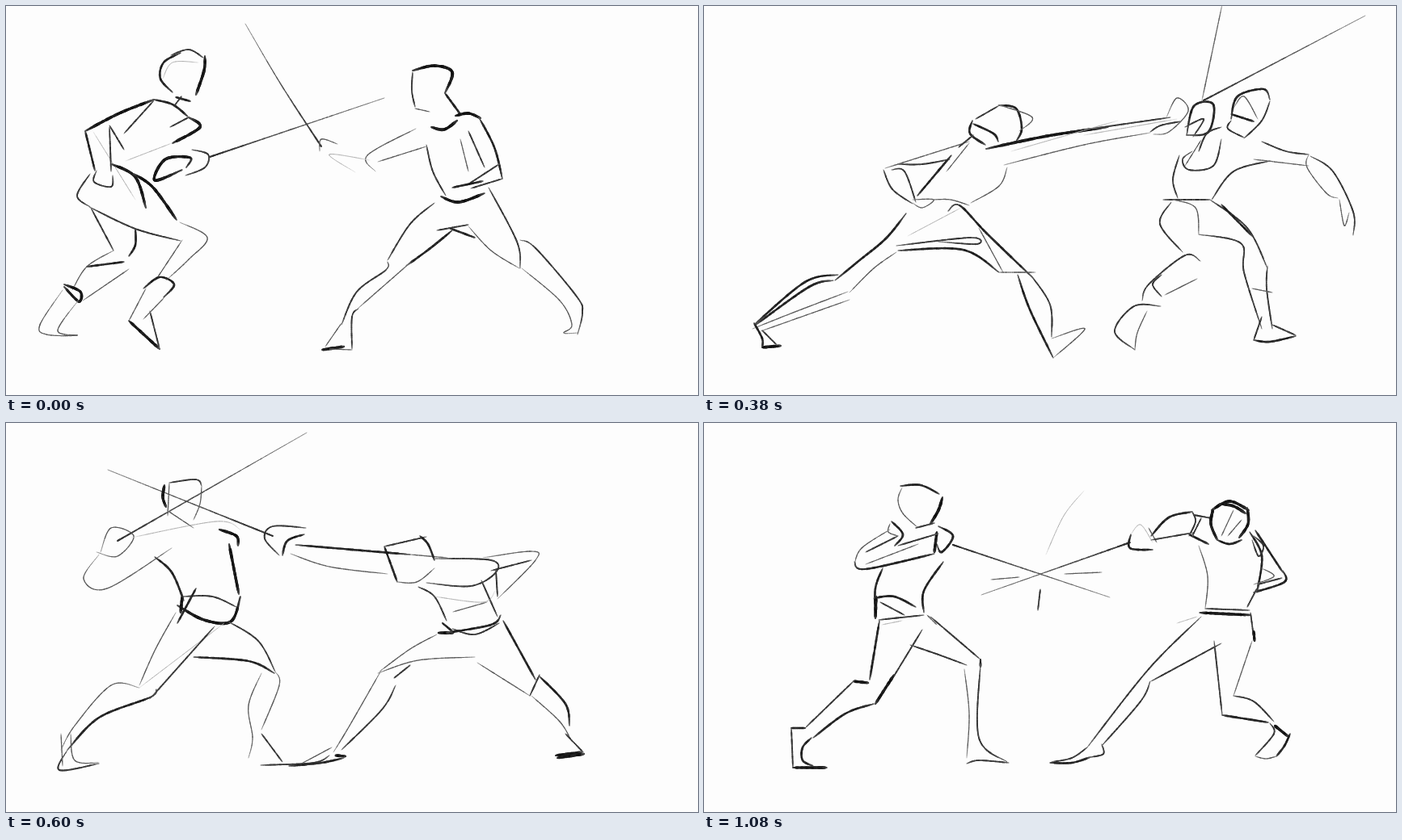
An HTML page with a canvas that plays this animation: 856x482 px, repeating every 1200 ms.

```html
<!DOCTYPE html>
<html lang="en">
<head>
<meta charset="utf-8">
<title>Fencers</title>
<style>
html, body { margin: 0; height: 100%; overflow: hidden; background: #fdfdfd; }
canvas { display: block; }
</style>
</head>
<body>
<canvas id="stage" width="856" height="482"></canvas>
<script>
const ctx = document.getElementById("stage").getContext("2d");
let seed;

function random() {
  seed = (seed * 16807) % 2147483647;
  return seed / 2147483647;
}

// Catmull-Rom value between b and c
function spline(a, b, c, d, t) {
  return b + t / 2 * (c - a + t * (2 * a - 5 * b + 4 * c - d + t * (3 * (b - c) + d - a)));
}

function trace(xy) {
  const pts = [], out = [];
  for (let i = 0; i < xy.length; i += 2) pts.push([xy[i], xy[i + 1]]);
  for (let i = 0; i < pts.length - 1; i++) {
    const b = pts[i], c = pts[i + 1];
    const a = pts[i - 1] || b, d = pts[i + 2] || c;
    const steps = Math.ceil(Math.hypot(c[0] - b[0], c[1] - b[1]) / 2);
    for (let s = 0; s < steps; s++) {
      out.push([0, 1].map(k => spline(a[k], b[k], c[k], d[k], s / steps)));
    }
  }
  out.push(pts[pts.length - 1]);
  return out;
}

const taper = u => Math.min(1, 0.45 + 3 * Math.min(u, 1 - u));
const fade = u => 1 - 0.7 * u;

// A pencil draws a curve through the given x, y points.
function pencil(width, dark, press = taper) {
  return (...xy) => {
    const line = trace(xy);
    for (let i = 1; i < line.length; i++) {
      const p = press(i / line.length);
      const shade = Math.min(215, dark + (1 - p) * 110 + random() * 25);
      ctx.strokeStyle = `rgb(${shade},${shade},${shade})`;
      ctx.lineWidth = width * p * (0.85 + 0.3 * random());
      ctx.beginPath();
      ctx.moveTo(...line[i - 1]);
      ctx.lineTo(...line[i]);
      ctx.stroke();
    }
  };
}

const faint = pencil(0.8, 160);
const thin = pencil(1.2, 80);
const line = pencil(1.8, 45);
const bold = pencil(2.5, 25);
const fat = pencil(3.4, 12);
const blade = pencil(2, 35, fade);

function approach() {
  blade(252, 187, 468, 114);
  blade(390, 174, 340, 97, 296, 22);
  // left
  bold(216, 58, 195, 70, 191, 90, 206, 107);
  line(204, 61, 226, 54, 244, 64);
  fat(246, 62, 245, 80, 235, 110);
  faint(194, 90, 206, 70, 238, 70);
  bold(210, 113, 228, 118);
  line(217, 112, 208, 124);
  fat(98, 155, 140, 133, 183, 116);
  bold(183, 116, 206, 122, 225, 137);
  line(183, 117, 146, 158);
  fat(206, 170, 240, 150, 226, 138);
  line(226, 138, 203, 150);
  faint(148, 192, 205, 170);
  faint(108, 156, 160, 240);
  bold(98, 155, 110, 204);
  line(128, 150, 130, 205);
  line(128, 148, 146, 178);
  line(112, 204, 109, 218, 130, 224, 132, 210);
  fat(131, 196, 160, 212, 173, 250);
  fat(223, 200, 228, 188, 197, 190, 184, 216, 218, 203);
  line(230, 178, 250, 184, 246, 200, 222, 210);
  line(104, 208, 88, 235, 104, 249);
  line(103, 249, 160, 276, 216, 291);
  line(105, 250, 133, 303);
  fat(158, 208, 182, 225, 211, 265);
  thin(215, 268, 249, 287, 226, 314, 198, 340);
  thin(218, 290, 185, 340);
  bold(160, 276, 160, 296, 152, 310);
  thin(133, 303, 100, 323, 82, 352);
  bold(146, 317, 100, 323);
  thin(152, 326, 95, 365);
  fat(72, 345, 92, 354, 90, 366, 72, 348);
  thin(70, 352, 42, 395, 50, 407, 88, 408, 64, 402, 90, 364);
  bold(170, 350, 190, 336, 208, 345, 195, 361);
  thin(173, 350, 152, 390);
  fat(152, 390, 190, 425);
  line(190, 425, 178, 378);
  thin(196, 361, 170, 388);
  // right
  fat(503, 80, 530, 74, 552, 82, 543, 108);
  line(503, 82, 502, 105, 506, 125);
  bold(543, 108, 562, 134);
  thin(506, 127, 524, 131);
  fat(526, 150, 542, 153, 558, 142);
  fat(556, 136, 572, 133, 587, 139);
  line(520, 172, 528, 205, 544, 235);
  thin(562, 165, 572, 205);
  bold(585, 138, 604, 175, 614, 214);
  line(572, 155, 592, 200);
  line(614, 214, 575, 226);
  line(610, 196, 570, 222);
  bold(552, 225, 590, 217);
  fat(538, 236, 560, 243, 592, 232);
  thin(507, 152, 447, 185, 457, 205);
  thin(520, 174, 460, 193);
  faint(450, 191, 400, 184, 432, 206);
  thin(410, 171, 390, 165, 388, 180);
  line(530, 244, 500, 270, 472, 315);
  bold(552, 278, 525, 300, 495, 322);
  thin(500, 318, 435, 375);
  line(472, 317, 470, 327, 434, 354, 415, 395);
  line(436, 375, 428, 385, 428, 425);
  thin(415, 393, 395, 422);
  fat(391, 426, 418, 422);
  thin(400, 425, 428, 426);
  line(533, 278, 572, 271);
  bold(548, 275, 580, 287);
  thin(572, 273, 600, 303, 635, 325);
  line(597, 225, 632, 292, 636, 325);
  line(636, 290, 655, 300, 706, 360, 713, 380, 707, 407);
  thin(638, 325, 685, 365, 700, 395, 690, 405, 708, 405);
}

function lunge() {
  thin(616, 117, 641, -2);
  blade(618, 117, 818, 12);
  // left
  bold(364, 123, 386, 127, 393, 152, 386, 168);
  thin(366, 123, 406, 138, 390, 155);
  line(364, 124, 336, 140);
  bold(332, 142, 329, 158, 348, 172);
  bold(333, 146, 358, 158, 364, 168);
  fat(349, 177, 425, 161, 500, 150);
  line(480, 152, 577, 138);
  thin(371, 197, 470, 172, 552, 157);
  faint(380, 180, 512, 142);
  faint(470, 160, 585, 140);
  thin(572, 138, 585, 114, 599, 130, 575, 156, 556, 159);
  line(552, 156, 565, 148, 590, 143);
  thin(328, 168, 224, 201);
  line(222, 203, 233, 227, 258, 245);
  line(232, 203, 248, 205, 262, 243);
  line(240, 196, 270, 196, 304, 190);
  line(333, 160, 315, 175);
  bold(306, 185, 264, 235);
  thin(328, 170, 300, 205);
  thin(375, 200, 365, 223, 330, 244);
  thin(258, 240, 284, 240, 270, 250, 258, 244);
  thin(283, 240, 305, 240, 328, 247);
  bold(302, 254, 316, 247, 350, 282, 406, 336);
  bold(250, 257, 225, 288, 190, 317, 162, 340);
  bold(240, 303, 320, 302, 365, 330);
  line(238, 297, 330, 287, 338, 295, 290, 292);
  thin(238, 305, 210, 325, 180, 355);
  faint(252, 285, 318, 250);
  thin(340, 275, 370, 330);
  thin(365, 330, 410, 330);
  bold(166, 333, 125, 342, 62, 395);
  bold(64, 395, 130, 348, 160, 340);
  thin(60, 400, 110, 380, 178, 354);
  thin(70, 403, 180, 364);
  bold(62, 393, 72, 412, 72, 423);
  fat(72, 423, 95, 421);
  line(72, 402, 90, 420);
  line(404, 333, 428, 370, 430, 410);
  bold(388, 333, 403, 376, 432, 436);
  thin(430, 412, 471, 400, 432, 436);
  // right
  bold(597, 160, 606, 124, 630, 122, 624, 156, 597, 160);
  line(595, 150, 618, 140, 605, 162);
  bold(652, 140, 660, 112, 692, 103, 700, 116);
  line(700, 118, 690, 142, 668, 164);
  line(652, 142, 648, 152, 668, 163);
  bold(652, 134, 680, 143);
  thin(656, 125, 668, 112, 685, 140);
  line(640, 150, 622, 158, 612, 180);
  thin(615, 166, 595, 198);
  line(640, 165, 630, 198, 600, 203, 592, 190, 604, 180);
  line(588, 185, 580, 215, 586, 238);
  line(700, 192, 655, 205, 628, 240);
  line(690, 168, 720, 180, 748, 184);
  thin(680, 190, 748, 198);
  thin(748, 184, 746, 200, 770, 232, 784, 238);
  line(750, 186, 778, 205, 803, 255, 803, 284);
  thin(786, 240, 792, 272, 798, 256);
  line(568, 240, 626, 240);
  line(626, 240, 672, 275, 697, 325);
  bold(640, 246, 678, 285);
  line(578, 243, 564, 270, 592, 305);
  thin(580, 240, 608, 250, 612, 283);
  line(612, 283, 664, 294, 668, 330, 690, 400);
  line(697, 322, 696, 350, 703, 400);
  thin(678, 350, 703, 355);
  line(690, 385, 680, 414);
  bold(680, 414, 700, 416, 732, 409);
  line(703, 395, 732, 408);
  line(614, 316, 595, 309, 550, 345, 542, 365);
  thin(610, 338, 570, 358);
  line(566, 333, 555, 345, 566, 360);
  line(565, 372, 532, 372, 508, 403, 533, 426);
  thin(533, 426, 536, 405, 548, 378);
}

function parry() {
  blade(138, 146, 372, 12);
  blade(330, 140, 126, 58);
  // left
  fat(196, 77, 194, 92, 198, 104);
  line(202, 74, 235, 70, 242, 78);
  thin(242, 78, 240, 100, 232, 120);
  thin(202, 74, 200, 115);
  thin(199, 108, 232, 130);
  thin(117, 160, 130, 130, 158, 140, 138, 165, 112, 160);
  thin(115, 163, 96, 193, 125, 205, 205, 155);
  faint(155, 142, 260, 122, 290, 132);
  fat(264, 132, 285, 140, 287, 152);
  fat(276, 150, 288, 212);
  bold(184, 166, 205, 185, 220, 220);
  fat(290, 215, 278, 246, 245, 244, 212, 226);
  line(218, 215, 255, 215, 285, 228);
  fat(218, 215, 216, 235);
  bold(235, 205, 212, 248);
  thin(210, 235, 185, 280, 165, 325);
  faint(270, 248, 165, 328);
  line(258, 252, 178, 342);
  line(275, 246, 312, 270, 333, 308);
  bold(232, 290, 300, 295, 332, 310);
  thin(165, 328, 130, 325, 85, 375, 68, 405);
  bold(186, 330, 178, 340, 115, 365, 76, 405);
  line(76, 405, 66, 430, 115, 422);
  thin(68, 385, 70, 425);
  thin(80, 385, 85, 418, 115, 421);
  thin(316, 310, 300, 350, 305, 390, 300, 415);
  thin(333, 308, 338, 325, 316, 380);
  line(316, 385, 342, 420);
  line(315, 424, 380, 421, 400, 412);
  // right
  line(371, 130, 330, 128, 320, 143, 338, 164);
  bold(369, 138, 348, 146, 342, 164);
  bold(358, 151, 500, 163);
  thin(500, 163, 546, 167);
  thin(352, 162, 400, 178, 472, 187);
  line(468, 153, 520, 141);
  bold(512, 140, 522, 150, 530, 170);
  bold(468, 153, 484, 197);
  thin(484, 197, 508, 197, 530, 180);
  line(530, 168, 600, 170, 606, 185, 575, 202, 520, 198);
  line(510, 203, 530, 215, 545, 245);
  line(588, 195, 608, 240);
  faint(530, 215, 590, 222, 605, 208);
  thin(553, 234, 595, 222);
  fat(535, 260, 553, 260);
  bold(540, 248, 552, 258);
  line(552, 255, 580, 262, 610, 248);
  bold(545, 260, 600, 250, 612, 238);
  line(600, 183, 650, 170);
  thin(590, 167, 650, 159, 655, 170, 608, 218);
  line(606, 182, 608, 215);
  thin(533, 262, 500, 280, 462, 308);
  thin(460, 310, 510, 294, 580, 290);
  line(480, 316, 500, 300);
  thin(583, 297, 648, 338);
  thin(465, 305, 425, 375, 405, 408);
  line(482, 325, 465, 355, 415, 405);
  bold(615, 245, 655, 318);
  line(660, 312, 648, 338);
  bold(660, 314, 692, 348, 697, 375);
  thin(650, 338, 685, 370, 700, 395);
  thin(403, 402, 360, 425);
  bold(350, 425, 390, 421, 418, 415);
  fat(408, 412, 420, 413);
  fat(680, 412, 712, 408);
  fat(682, 415, 715, 410);
  line(692, 385, 714, 408);
}

function cross() {
  blade(278, 213, 370, 277, 442, 323);
  blade(513, 190, 318, 310);
  line(510, 191, 375, 272);
  // left
  bold(246, 78, 270, 72, 297, 82, 284, 125);
  faint(248, 76, 236, 100, 248, 125);
  thin(252, 88, 268, 68, 285, 90);
  thin(255, 95, 260, 110, 250, 122);
  bold(246, 121, 258, 126);
  line(270, 127, 285, 128);
  thin(215, 118, 173, 185);
  bold(212, 120, 225, 130, 232, 125);
  thin(232, 128, 195, 175);
  bold(170, 190, 195, 190, 225, 194);
  thin(222, 150, 218, 180);
  thin(190, 180, 235, 195);
  thin(196, 173, 265, 188);
  thin(232, 200, 270, 188, 284, 200, 265, 210, 235, 198);
  line(274, 133, 284, 170, 284, 210);
  bold(210, 213, 278, 212);
  fat(214, 210, 205, 235, 270, 247);
  bold(276, 215, 270, 250);
  thin(230, 238, 250, 252, 270, 255);
  thin(255, 258, 210, 325);
  thin(268, 252, 215, 320);
  bold(272, 240, 310, 270, 337, 312);
  bold(243, 290, 290, 296, 315, 309);
  thin(337, 312, 338, 328, 315, 380);
  thin(318, 308, 303, 350, 308, 390, 300, 418);
  line(306, 385, 320, 405, 345, 427);
  bold(298, 422, 345, 428);
  faint(330, 318, 308, 395);
  faint(200, 325, 180, 307, 140, 325, 122, 355);
  thin(203, 318, 160, 316, 130, 345);
  line(210, 328, 198, 350, 165, 340, 130, 358);
  thin(130, 358, 103, 408);
  bold(128, 350, 92, 376);
  line(92, 376, 106, 422);
  thin(120, 345, 112, 385);
  // right
  thin(518, 185, 538, 150, 548, 180, 525, 198, 513, 190);
  fat(549, 174, 569, 163);
  bold(549, 160, 570, 131, 608, 117, 635, 143);
  line(570, 160, 606, 140);
  thin(595, 150, 612, 120);
  bold(650, 97, 675, 87, 698, 87, 692, 122);
  line(650, 97, 643, 120, 645, 138, 680, 135);
  thin(692, 120, 684, 138);
  thin(605, 140, 640, 148, 675, 143);
  thin(615, 145, 625, 170, 600, 210, 578, 245);
  faint(612, 185, 672, 208, 700, 180, 660, 145);
  thin(672, 205, 650, 240);
  fat(652, 222, 670, 225, 658, 232);
  bold(680, 130, 700, 165, 735, 208);
  line(680, 145, 710, 175, 732, 205);
  line(735, 208, 705, 222, 655, 237);
  thin(690, 188, 660, 215);
  fat(560, 247, 605, 242, 648, 248);
  fat(566, 252, 585, 261, 640, 256);
  thin(575, 250, 645, 250, 630, 266);
  bold(565, 250, 522, 316);
  fat(572, 290, 536, 330);
  bold(568, 278, 615, 293, 648, 320);
  line(522, 316, 500, 320, 452, 392);
  thin(548, 332, 470, 380);
  line(448, 390, 415, 423);
  fat(415, 423, 453, 423);
  line(466, 385, 453, 423);
  bold(460, 388, 440, 408);
  bold(648, 258, 655, 285, 668, 325);
  bold(606, 287, 655, 350);
  line(632, 285, 655, 345);
  fat(655, 350, 672, 340);
  bold(670, 325, 700, 352, 718, 395);
  line(665, 345, 720, 400);
  bold(660, 350, 685, 345, 695, 352);
  bold(670, 355, 712, 392);
  fat(700, 415, 735, 414);
  bold(730, 395, 708, 420);
  line(720, 400, 735, 410);
}

function clash() {
  thin(288, 154, 574, 16);
  line(470, 64, 574, 16);
  thin(490, 192, 425, 87, 375, -2);
  thin(385, 73, 393, 79);
  faint(428, 62, 441, 40);
  bold(453, 84, 494, 73);
  // left
  thin(234, 95, 250, 80, 275, 73);
  line(270, 73, 285, 72, 285, 95, 282, 118);
  thin(240, 92, 243, 115);
  line(243, 115, 255, 124, 283, 119);
  bold(222, 126, 262, 143);
  line(218, 140, 218, 195);
  line(275, 140, 276, 170);
  bold(281, 132, 291, 145, 280, 162);
  thin(219, 138, 190, 160, 174, 208);
  thin(228, 142, 222, 170);
  line(176, 192, 240, 178);
  bold(174, 206, 195, 213);
  thin(200, 212, 262, 180);
  thin(245, 190, 252, 165, 277, 155, 262, 187, 245, 192);
  thin(283, 160, 283, 210);
  fat(274, 208, 280, 235);
  thin(214, 222, 245, 215, 280, 222);
  thin(217, 230, 250, 226, 282, 235);
  line(218, 240, 285, 238);
  faint(215, 235, 262, 230);
  thin(212, 215, 225, 240);
  bold(217, 242, 209, 275, 203, 313);
  bold(285, 238, 318, 260, 338, 300);
  fat(245, 275, 280, 288, 310, 305);
  line(270, 255, 240, 290);
  bold(248, 278, 218, 330);
  thin(240, 280, 228, 325);
  thin(310, 305, 322, 312, 338, 300);
  line(333, 315, 318, 380);
  thin(314, 312, 302, 380, 305, 410);
  bold(318, 378, 322, 395, 338, 425);
  line(304, 411, 320, 414, 340, 427);
  thin(203, 310, 155, 335, 122, 378);
  bold(195, 300, 185, 310);
  thin(205, 315, 215, 320, 208, 340);
  line(205, 345, 180, 352, 128, 395);
  bold(148, 378, 125, 400);
  bold(125, 375, 117, 395, 118, 415);
  fat(118, 408, 125, 420, 148, 426);
  thin(113, 362, 106, 425);
  line(100, 425, 130, 425);
  // right
  line(475, 212, 488, 184, 508, 203, 485, 223, 475, 212);
  thin(490, 195, 500, 192, 505, 205);
  fat(503, 217, 514, 233);
  thin(505, 210, 540, 180, 590, 160);
  line(585, 163, 645, 133);
  thin(510, 215, 617, 183);
  line(505, 212, 580, 195);
  thin(525, 220, 595, 170);
  bold(638, 84, 665, 81, 691, 92, 678, 122);
  bold(638, 84, 637, 110, 635, 130);
  thin(638, 95, 640, 125);
  line(640, 133, 678, 120);
  faint(650, 135, 635, 195);
  faint(640, 140, 628, 175, 632, 200);
  line(675, 135, 664, 155, 692, 172);
  bold(672, 132, 706, 172);
  line(628, 208, 645, 192, 673, 190);
  faint(673, 190, 685, 210, 685, 250);
  thin(630, 210, 628, 245);
  thin(688, 205, 685, 240);
  bold(700, 155, 715, 212);
  bold(674, 180, 708, 220);
  line(720, 214, 688, 230);
  bold(684, 233, 710, 225);
  line(620, 244, 655, 243, 688, 266);
  line(625, 245, 585, 275, 545, 312);
  bold(626, 278, 555, 318);
  bold(622, 290, 550, 320);
  line(628, 260, 625, 350);
  thin(683, 260, 640, 345);
  line(536, 310, 500, 370, 478, 400, 430, 418);
  line(548, 325, 545, 350, 498, 395, 490, 410);
  thin(540, 305, 538, 325, 555, 318);
  bold(428, 419, 455, 420, 482, 413);
  thin(648, 335, 655, 345, 625, 350);
  line(640, 340, 695, 355, 712, 375);
  line(625, 355, 650, 367, 690, 373);
  thin(690, 348, 690, 372);
  bold(705, 378, 702, 395, 685, 405);
  fat(712, 375, 722, 388, 706, 415);
  fat(683, 414, 700, 414);
  fat(705, 395, 700, 412);
}

function recover() {
  blade(308, 151, 502, 216);
  blade(527, 148, 343, 213);
  faint(470, 84, 445, 115, 423, 163);
  thin(355, 194, 390, 191);
  thin(446, 187, 492, 185);
  line(416, 206, 413, 232);
  // left
  bold(243, 78, 268, 77, 291, 88);
  fat(295, 92, 290, 108, 280, 125);
  thin(245, 80, 240, 95, 246, 112, 265, 130);
  line(262, 130, 285, 124);
  bold(290, 128, 308, 140, 294, 160, 288, 150);
  fat(288, 135, 285, 160);
  bold(232, 122, 246, 138, 236, 152);
  thin(230, 125, 228, 135, 240, 140);
  thin(230, 132, 195, 155, 186, 175);
  line(240, 140, 200, 160);
  bold(186, 172, 200, 181, 285, 162);
  line(240, 152, 290, 137);
  thin(200, 175, 265, 150);
  bold(221, 180, 212, 205, 212, 240);
  bold(296, 172, 272, 208, 272, 235);
  bold(210, 217, 235, 215, 262, 228);
  line(218, 222, 248, 238);
  fat(213, 215, 212, 242);
  line(216, 244, 272, 238);
  faint(220, 250, 245, 245);
  bold(217, 245, 205, 318);
  thin(276, 238, 288, 250);
  line(280, 240, 342, 293);
  line(270, 256, 228, 325);
  fat(235, 312, 212, 348);
  line(255, 275, 290, 287, 325, 300);
  bold(342, 293, 342, 302);
  thin(322, 305, 328, 360, 325, 415);
  line(342, 298, 340, 390, 375, 420);
  line(325, 422, 340, 418, 377, 421);
  fat(185, 320, 203, 322);
  line(187, 318, 125, 378);
  bold(210, 348, 175, 360, 135, 390);
  bold(108, 378, 125, 378);
  line(108, 378, 110, 427);
  fat(110, 427, 152, 427);
  bold(133, 390, 122, 402, 122, 418, 135, 425);
  // right
  bold(528, 138, 527, 155, 555, 157);
  faint(528, 138, 540, 126, 555, 148);
  thin(550, 130, 560, 148);
  bold(553, 140, 575, 117, 604, 110);
  line(604, 110, 608, 122, 600, 140);
  line(553, 145, 605, 136);
  bold(600, 138, 624, 150);
  line(606, 114, 628, 118);
  line(615, 118, 604, 140);
  fat(628, 108, 650, 97, 674, 108);
  fat(630, 106, 627, 125, 635, 145);
  fat(672, 105, 673, 125, 662, 142);
  fat(638, 100, 655, 103, 670, 112);
  bold(635, 145, 650, 150, 665, 145);
  thin(655, 108, 640, 140);
  thin(665, 120, 648, 140);
  thin(612, 152, 623, 190, 620, 230);
  bold(675, 135, 690, 165, 684, 210);
  line(680, 140, 692, 152, 686, 165, 678, 145);
  line(684, 205, 672, 228);
  bold(682, 133, 716, 185);
  bold(716, 183, 718, 197, 680, 210);
  line(685, 200, 715, 192);
  thin(690, 180, 705, 190, 680, 200);
  fat(613, 235, 676, 238);
  line(620, 230, 675, 232);
  faint(585, 248, 610, 240);
  line(676, 235, 680, 265);
  fat(680, 258, 681, 270);
  line(615, 240, 550, 305, 474, 402);
  line(640, 273, 553, 320);
  line(552, 320, 540, 345, 492, 400);
  line(474, 402, 455, 415, 430, 420);
  bold(428, 421, 455, 421, 478, 414);
  line(478, 414, 494, 410, 492, 398);
  line(631, 270, 641, 362);
  thin(678, 270, 655, 338);
  line(655, 338, 680, 345, 705, 370);
  bold(641, 362, 698, 371);
  fat(706, 375, 722, 388);
  line(700, 372, 705, 385, 682, 412);
  bold(725, 385, 718, 400, 708, 413);
  thin(682, 413, 695, 416, 708, 413);
}

const poses = [[240, approach], [480, lunge], [680, parry], [880, cross], [1080, clash], [1200, recover]];
const start = performance.now();
let shown;

function tick() {
  const time = (performance.now() - start) % 1200;
  const [end, pose] = poses.find(p => time < p[0]);
  if (pose !== shown) {
    shown = pose;
    seed = end;
    ctx.fillStyle = "#fdfdfd";
    ctx.fillRect(0, 0, 856, 482);
    ctx.lineCap = "round";
    pose();
  }
  requestAnimationFrame(tick);
}
tick();
</script>
</body>
</html>
```
